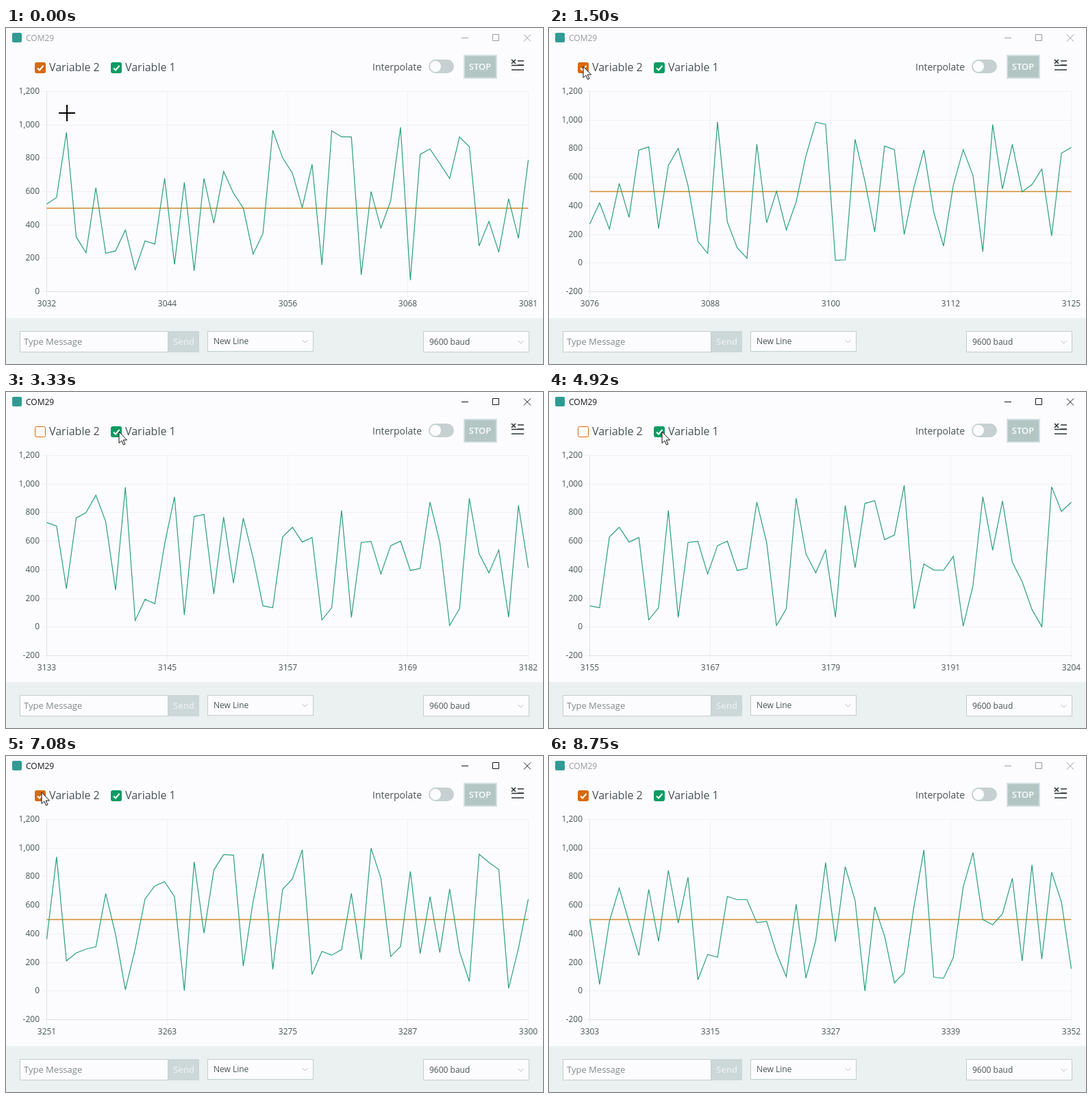
These frames come from a looping animation (784x490 px, 8790 ms). An HTML page:

```html
<!DOCTYPE html>
<html lang="en">
<head>
<meta charset="utf-8">
<title>Serial plotter</title>
<style>
html, body { margin: 0; width: 100%; height: 100%; overflow: hidden; background: #fcfcfe; }
svg { display: block; width: 784px; height: 490px; font: 12px "Open Sans", sans-serif; fill: #4a5256; }
.line { fill: none; stroke: #2a9f7c; stroke-width: 1.2; }
.field { fill: #fcfcfe; stroke: #c3cfc8; }
.stroke { fill: none; stroke: currentColor; }
</style>
</head>
<body>
<svg viewBox="0 0 784 490">
  <rect width="784" height="490" fill="#fcfcfe"/>
  <rect x="9" y="7" width="14" height="14" rx="2" fill="#2f9c94"/>
  <g id="titleBar">
    <text x="29" y="18.5" fill="currentColor">COM29</text>
    <path class="stroke" d="M665 14.5h10M710.5 9.5h9v9h-9zM756 9.5l10 10m0-10l-10 10"/>
  </g>

  <g id="boxes"></g>
  <text x="63" y="63" font-size="16">Variable 2</text>
  <text x="174" y="63" font-size="16">Variable 1</text>
  <text x="535" y="62" font-size="14">Interpolate</text>
  <rect x="617" y="46" width="37" height="20" rx="10" fill="#c6d0d0"/>
  <circle cx="627" cy="56" r="8" fill="#fcfcfe"/>
  <rect x="669" y="40" width="47" height="33" fill="#b3c6c4" stroke="#d3dfe3" stroke-width="2"/>
  <text x="692" y="61" font-size="13" font-weight="600" text-anchor="middle" fill="#fafcfc">STOP</text>
  <path d="M738 46l6 6m0-6l-6 6M747 48h9M747 54h9M738 54.500h18M738 61h18" fill="none" stroke="#2c3336" stroke-width="1.6"/>

  <g id="axes"></g>
  <path id="constant" class="line" style="stroke:#d08c28;stroke-width:1.5"/>
  <polyline id="random" class="line"/>

  <rect y="423" width="784" height="67" fill="#ebf0f0"/>
  <rect class="field" x="20.5" y="442.5" width="216" height="30"/>
  <text x="26" y="462" font-size="13" fill="#83898a">Type Message</text>
  <rect x="237" y="442" width="45" height="31" fill="#ccd7d8"/>
  <text x="244" y="462" font-size="13" font-weight="600" fill="#eaf0f0">Send</text>
  <rect class="field" x="294.5" y="442.5" width="154" height="29"/>
  <text x="303" y="461">New Line</text>
  <rect class="field" x="609.5" y="442.5" width="154" height="30"/>
  <text x="618" y="462">9600 baud</text>
  <path d="M432.500 455l4 4 4-4M747.500 456l4 4 4-4" fill="none" stroke="#b4bcba"/>

  <g id="cursor">
    <path id="arrow" d="M0 0V16.500L3.800 13l2.700 6 2.400-1-2.700-6H11.500z" fill="#fff" stroke="#111"/>
    <path id="cross" d="M-12 0h24M0-12v24" fill="none" stroke="#000" stroke-width="2"/>
  </g>
</svg>
<script>
const LOOP = 8790, FIRST = 3032, SPAN = 49, COUNT = 321;
const LEFT = 59.5, RIGHT = 762.5, TOP = 92.5, BOTTOM = 384.5;
const $ = id => document.getElementById(id);

// The board's default generator: random(0, 1000) is the state modulo 1000
const next = state => state * 16807 % 2147483647;

// Run the generator until it passes near the first readings
function findState(readings) {
  const follows = state => readings.every(v => {
    const near = Math.abs(state % 1000 - v) < 14;
    state = next(state);
    return near;
  });
  let state = 1;
  for (let n = 0; n < 4e6 && !follows(state); n++) state = next(state);
  return state;
}

const samples = [];
let state = findState([522, 563, 953, 329, 230, 621, 228, 243, 370, 132, 304, 284]);
while (samples.length < COUNT) {
  samples.push(state % 1000);
  state = next(state);
}

// Rows of [time, value, ...], linear in between
const scroll = [[0, 3032], [130, 3033], [1500, 3076], [2290, 3102], [3330, 3133], [3750, 3147], [4919, 3147],
  [4920, 3155], [5790, 3182], [6669, 3182], [6670, 3238], [7080, 3251], [8750, 3303]];
const pointer = [[130, 89, 124], [900, 50, 56], [2500, 50, 56], [3200, 165, 58], [5000, 165, 58],
  [5800, 52, 53], [7500, 52, 53], [8350, 120, 515]];

function at(track, t, col = 1) {
  const i = track.findIndex(row => row[0] > t);
  if (i < 0) return track[track.length - 1][col];
  if (i === 0) return track[0][col];
  const a = track[i - 1], b = track[i];
  return a[col] + (b[col] - a[col]) * (t - a[0]) / (b[0] - a[0]);
}

function checkbox(x, color, on) {
  return `<rect x="${x + .5}" y="50.5" width="15" height="15" rx="2" fill="${on ? color : '#fcfcfe'}" stroke="${color}"/>` +
    (on ? `<path d="M${x + 4} 58.500l3 3 5.500-6.500" fill="none" stroke="#fff" stroke-width="2"/>` : '');
}

function drawChart(start, showConstant, showRandom) {
  const view = samples.slice(start - FIRST, start - FIRST + SPAN + 1);
  const min = Math.min(...view), max = Math.max(...view), grace = (max - min) * .05;
  const lo = Math.floor((min - grace) / 200) * 200, hi = Math.ceil((max + grace) / 200) * 200;
  const toY = v => BOTTOM - (v - lo) / (hi - lo) * (BOTTOM - TOP);
  const toX = i => LEFT + i / SPAN * (RIGHT - LEFT);

  let grid = '', labels = '';
  for (let v = lo; v <= hi; v += 200) {
    const y = Math.floor(toY(v)) + .5;
    grid += `M52 ${y}H${RIGHT}`;
    labels += `<text x="49" y="${y + 3.5}" text-anchor="end">${v.toLocaleString('en-US')}</text>`;
  }
  for (let k = 0; k <= 4; k++) {
    const i = k * SPAN / 4, x = Math.floor(toX(i)) + .5;
    grid += `M${x} ${TOP}V392`;
    labels += `<text x="${x}" y="406" text-anchor="middle">${Math.floor(start + i)}</text>`;
  }
  $('axes').innerHTML = `<path d="${grid}" stroke="#eff1f5"/>` +
    `<path d="M${LEFT} ${TOP}V${BOTTOM}H${RIGHT}" fill="none" stroke="#dde1e2"/>` + labels;
  $('constant').setAttribute('d', showConstant ? `M${LEFT} ${toY(500)}H${RIGHT}` : '');
  $('random').setAttribute('points', showRandom ? view.map((v, i) => toX(i) + ',' + toY(v)).join(' ') : '');
}

function draw(t) {
  const showConstant = t < 1800 || t >= 6670;
  const showRandom = t < 3750 || t >= 4920;
  const active = t >= 1800 && t < 8460;
  $('titleBar').style.color = active ? '#16181a' : '#969a9c';
  $('boxes').innerHTML = checkbox(42, '#d66a12', showConstant) + checkbox(153, '#0c9c62', showRandom);
  drawChart(Math.floor(at(scroll, t)), showConstant, showRandom);

  const x = at(pointer, t), y = at(pointer, t, 2);
  const overChart = y > 85 && y < 410;
  $('cursor').setAttribute('transform', `translate(${x} ${y})`);
  $('cross').style.display = overChart ? '' : 'none';
  $('arrow').style.display = overChart ? 'none' : '';
}

function tick() {
  draw(performance.now() % LOOP);
  requestAnimationFrame(tick);
}
tick();
</script>
</body>
</html>
```
